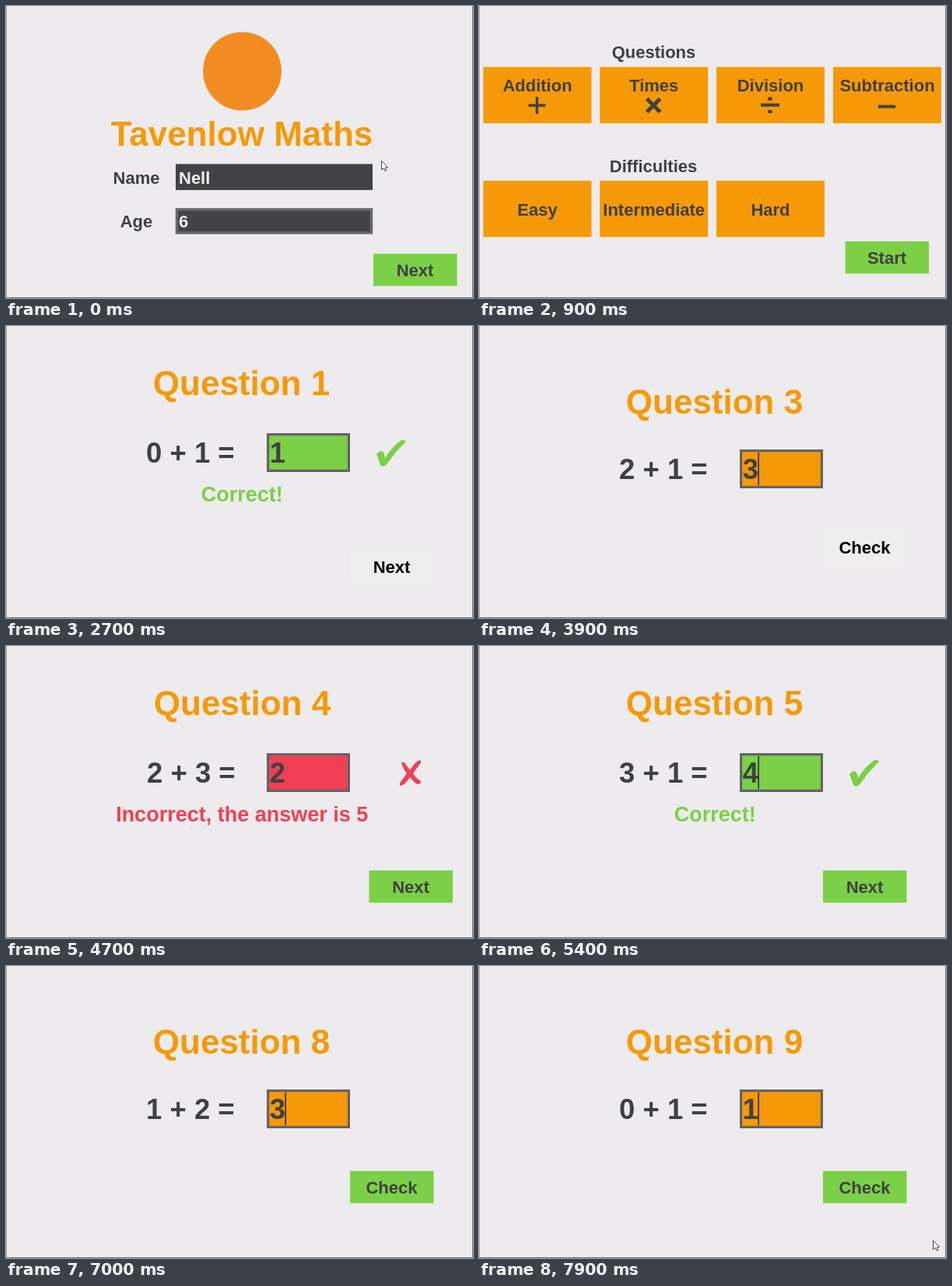
Recreate the animation shown at these times as an HTML page. Size 600x376 px, loop 8 s.

```html
<!DOCTYPE html>
<html lang="en">
<head>
<meta charset="utf-8">
<title>Maths quiz</title>
<style>
  :root { --bg: #edebed; --dark: #404043; --orange: #f69907; --green: #7cd047; --red: #f04055; }
  html, body { margin: 0; width: 100%; height: 100%; overflow: hidden; background: var(--bg); }
  svg { display: block; width: 600px; height: 376px; }
  text { font: bold 22px "Liberation Sans", Arial, sans-serif; text-anchor: middle; fill: var(--dark); white-space: pre; }
  .title { font-size: 44px; fill: var(--orange); }
  .sum { font-size: 36.5px; text-anchor: start; }
  .note { font-size: 27px; }
  .entry { text-anchor: start; fill: #f0eff0; }
  .input { fill: #434345; }
  .button rect { fill: var(--green); }
  .button.hover rect { fill: #efeeee; }
  .button.hover text { fill: #000; }
  .option rect { fill: var(--orange); }
  .option path { fill: none; stroke: var(--dark); stroke-width: 4; }
  .option.on rect { fill: #67af36; }
  .option.on text { fill: #efedee; }
  .option.on path { stroke: #efedee; }
  [hidden] { display: none; }
</style>
</head>
<body>
<svg viewBox="0 0 600 376">
  <rect width="600" height="376" fill="#edebed"/>

  <g id="login">
    <circle cx="303.5" cy="84" r="50.5" fill="#f28c22"/>
    <text class="title" x="303" y="180">Tavenlow Maths</text>
    <text x="167.5" y="228.5">Name</text>
    <rect class="input" x="218" y="203.5" width="253" height="33.5"/>
    <text class="entry" x="222" y="228.5">Nell</text>
    <text x="167.5" y="285">Age</text>
    <rect class="input" x="219.5" y="262" width="250" height="30" stroke="#69676c" stroke-width="3.5"/>
    <text class="entry" x="222" y="285">6</text>
    <g id="loginNext" class="button" transform="translate(472 319)">
      <rect width="107.5" height="41.5"/><text x="53.5" y="29">Next</text>
    </g>
  </g>

  <g id="menu">
    <text x="224.5" y="66.5">Questions</text>
    <text x="224" y="213.5">Difficulties</text>
    <g id="addition" class="option" transform="translate(5.5 78.5)">
      <rect width="139" height="72.5"/><text x="69.5" y="31.5">Addition</text>
      <path d="M58 49.5h22M69 38.5v22" style="stroke-width:3.4"/>
    </g>
    <g class="option" transform="translate(155.2 78.5)">
      <rect width="139" height="72.5"/><text x="69.5" y="31.5">Times</text>
      <path d="M60.5 41l17 17M77.5 41l-17 17" style="stroke-width:5"/>
    </g>
    <g class="option" transform="translate(305 78.5)">
      <rect width="139" height="72.5"/><text x="69.5" y="31.5">Division</text>
      <path d="M57 49h24M66.3 41h5.4M66.3 57.5h5.4"/>
    </g>
    <g class="option" transform="translate(455 78.5)">
      <rect width="139" height="72.5"/><text x="69.5" y="31.5">Subtraction</text>
      <path d="M58 51h22"/>
    </g>
    <g id="easy" class="option" transform="translate(5.5 225)">
      <rect width="139" height="72.5"/><text x="69.5" y="44.5">Easy</text>
    </g>
    <g class="option" transform="translate(155.2 225)">
      <rect width="139" height="72.5"/><text x="69.5" y="44.5">Intermediate</text>
    </g>
    <g class="option" transform="translate(305 225)">
      <rect width="139" height="72.5"/><text x="69.5" y="44.5">Hard</text>
    </g>
    <g id="start" class="button" transform="translate(470.5 303)">
      <rect width="107.5" height="41.5"/><text x="53.5" y="29">Start</text>
    </g>
  </g>

  <g id="quiz">
    <text id="heading" class="title"></text>
    <text id="sum" class="sum"></text>
    <g id="field">
      <rect id="box" x="335" width="107" height="50"/>
      <rect id="ring" x="336.6" y="1.6" width="103.8" height="46.8" fill="none" stroke="#646367" stroke-width="3.2"/>
      <text id="reply" class="sum" x="338.7" y="37.8"></text>
      <rect id="caret" y="4" width="1.6" height="42" fill="#2a2a2c"/>
    </g>
    <text id="note" class="note" y="226"></text>
    <path id="tick" fill="#7cd047" d="M476 165Q480 160 484 161.500Q486 164 487 170Q496 155 508 147Q512 146 514 149Q500 162 490 177Q485 183 481 179Q479 173 476 165Z"/>
    <path id="cross" fill="#f04055" d="M508 150Q512 148 514 153L519 160Q526 148 532 147Q535 149 531 153L523 164Q527 171 533 174Q534 177 529 178Q524 176 519 169Q513 178 508 180Q504 179 507 175L515 164Q510 158 508 150Z"/>
    <g id="action" class="button">
      <rect width="107.5" height="41.5"/><text id="actionLabel" x="53.5" y="29"></text>
    </g>
  </g>

  <path d="M.5 0V376" stroke="#a3a2a4"/>
  <path d="M599.5 0V376M0 375.500H600" stroke="#6c6b6e"/>
  <path id="cursor" d="M.5 .5V12L3.200 9.600L5 13.500L6.800 12.700L5.200 9H8.700Z" fill="#fff" stroke="#333" stroke-width=".9"/>
</svg>
<script>
const LOOP = 8000, STEP = 100, BLINK = 400;
const MENU_AT = 400, QUIZ_AT = 2000;

// start, first term, second term, reply, time typed, time checked
const questions = [
  [2000, 0, 1, 1, 2300, 2600],
  [2900, 1, 2, 3, 3100, 3300],
  [3500, 2, 1, 3, 3700, 4000],
  [4100, 2, 3, 2, 4200, 4400],
  [5000, 3, 1, 4, 5100, 5300],
  [5500, 1, 1, 2, 5600, 5800],
  [6000, 1, 3, 4, 6400, 6600],
  [6800, 1, 2, 3, 7000, 7200],
  [7400, 0, 1, 1, 7700, LOOP]
];

const el = {};
document.querySelectorAll("[id]").forEach(node => el[node.id] = node);

const show = (node, on) => node.toggleAttribute("hidden", !on);
const move = (node, x, y) => node.setAttribute("transform", `translate(${x} ${y})`);
const set = (node, text, x, y) => {
  node.textContent = text;
  node.setAttribute("x", x);
  node.setAttribute("y", y);
};

function drawQuiz(t) {
  const index = questions.findLastIndex(q => q[0] <= t);
  const [, a, b, reply, typedAt, checkedAt] = questions[index];
  const typed = t >= typedAt, checked = t >= checkedAt;
  const focused = t >= typedAt - 100;
  const right = reply === a + b;
  const wrong = checked && !right;
  const nudge = wrong ? 1 : 0;

  set(el.heading, `Question ${index + 1}`, 302.5 + nudge, checked ? 88.8 : 113.3);
  set(el.sum, `${a} + ${b} =`, 180 + nudge, checked ? 175.8 : 196.8);
  move(el.field, 0, checked ? 138 : 159);
  el.box.style.fill = `var(--${!checked ? "orange" : right ? "green" : "red"})`;
  show(el.ring, focused);
  el.reply.textContent = typed ? reply : "";
  el.caret.setAttribute("x", typed ? 358.3 : 339);
  show(el.caret, focused && (t < typedAt || Math.floor((t - typedAt) / BLINK) % 2 === 0));

  show(el.note, checked);
  show(el.tick, checked && right);
  show(el.cross, wrong);
  set(el.note, right ? "Correct!" : `Incorrect, the answer is ${a + b}`, 303.2, 226);
  el.note.style.fill = `var(--${right ? "green" : "red"})`;

  move(el.action, wrong ? 466.5 : 442, checked ? 289 : 264);
  el.actionLabel.textContent = checked ? "Next" : "Check";
  el.action.classList.toggle("hover", t < 4000);
}

function drawCursor(t) {
  const glide = (from, to, x0, y0, x1, y1) => {
    const p = Math.min(1, Math.max(0, (t - from) / (to - from)));
    const e = p * p * (3 - 2 * p);
    move(el.cursor, x0 + (x1 - x0) * e, y0 + (y1 - y0) * e);
  };
  const leaving = t >= 7600;
  show(el.cursor, t < 300 || leaving);
  if (leaving) glide(7600, 7900, 545, 300, 583, 353);
  else glide(0, 300, 482, 199, 522, 334);
}

function draw(t) {
  show(el.login, t < MENU_AT);
  show(el.menu, t >= MENU_AT && t < QUIZ_AT);
  show(el.quiz, t >= QUIZ_AT);
  el.loginNext.classList.toggle("hover", t >= 300);
  el.addition.classList.toggle("on", t >= 1000);
  el.easy.classList.toggle("on", t >= 1400);
  el.start.classList.toggle("hover", t >= 1900);
  if (t >= QUIZ_AT) drawQuiz(t);
  drawCursor(t);
}

const origin = performance.now();
function tick() {
  const t = (performance.now() - origin) % LOOP;
  draw(Math.floor(t / STEP) * STEP);
  requestAnimationFrame(tick);
}
tick();
</script>
</body>
</html>
```
